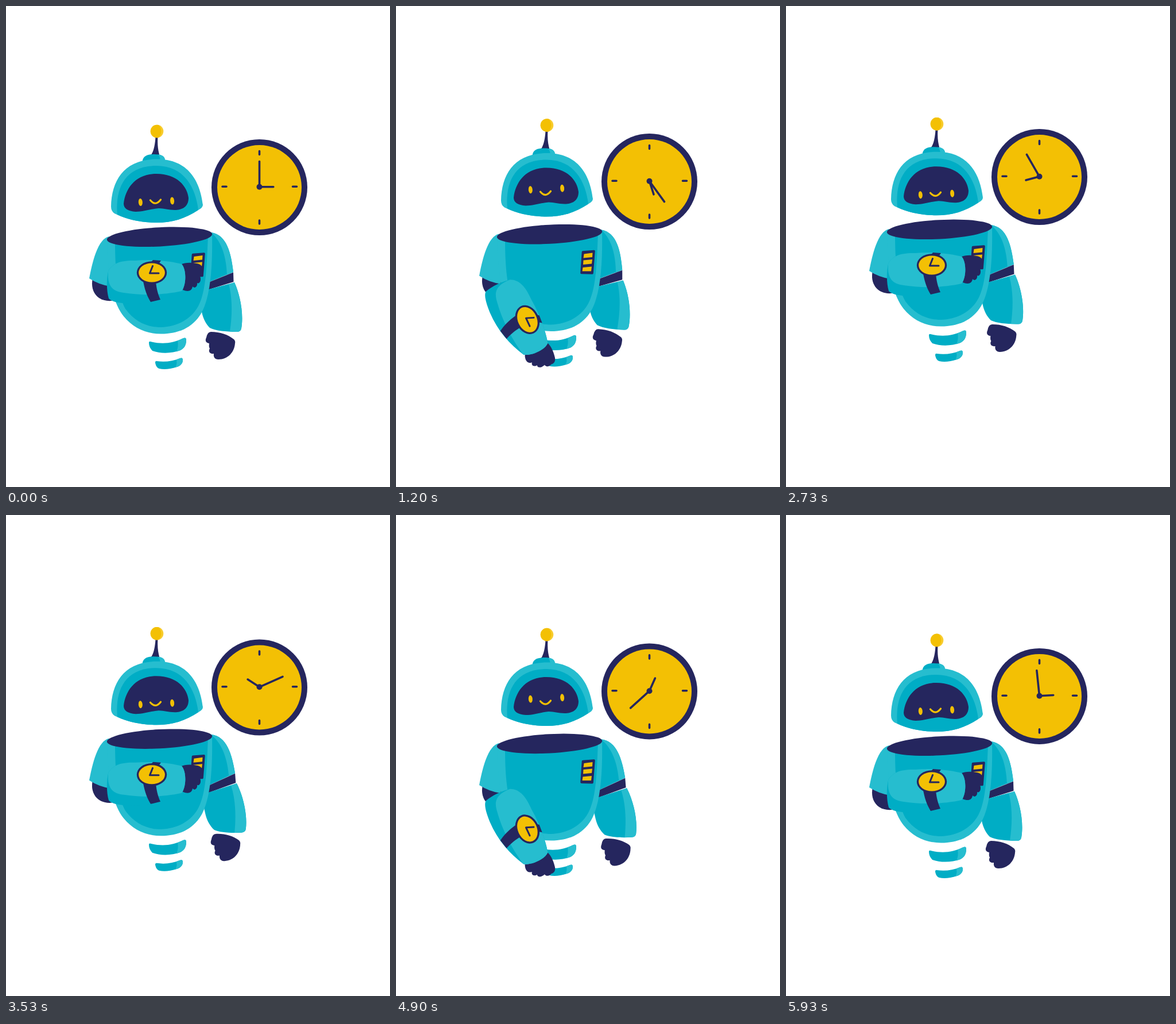
An HTML page for the animation above (6.01 s loop, 669 px wide and 837 px high).

```html
<!DOCTYPE html>
<html lang="en">
<head>
<meta charset="utf-8">
<title>Robot and clock</title>
<style>
html, body { margin: 0; width: 100%; height: 100%; overflow: hidden; background: #fff; }
svg { display: block; width: 100vw; height: 100vh; }
.navy { fill: #25265e; }
.main { fill: #00adc5; }
.light { fill: #26bdcf; }
.gold { fill: #f3c004; }
.line { fill: none; stroke: #25265e; stroke-width: 3.6; stroke-linecap: round; stroke-linejoin: round; }
</style>
</head>
<body>
<svg viewBox="0 0 669 837">
  <g id="clock">
    <circle class="navy" cx="441.5" cy="315.5" r="83.5"/>
    <circle class="gold" cx="441.5" cy="315.5" r="73.5"/>
    <path class="line" d="M441.5 252.5V258.5M441.5 373V379M377 314.3H384M499.5 314.3H506.5"/>
    <path class="line" id="minute" d="M441.5 314.8V270.5"/>
    <path class="line" id="hour" d="M441.5 314.8V290.5"/>
    <circle class="navy" cx="441.5" cy="314.8" r="5"/>
  </g>

  <g id="body">
    <g id="rightArm">
      <path class="main" d="M335 400L357 394C385 398 392 430 396 463L357 479L335 488Z"/>
      <path class="light" d="M357 394C385 398 392 430 396 463L385 468C384 442 378 411 357 394Z"/>
      <path class="navy" d="M335 488L396 463.500L396.500 480L335 499Z"/>
      <path class="main" d="M335 498L398 481C409 505 414 538 410 561Q409 567 402 567C383 567 365 565 355 560C348 553 343 543 341 532Z"/>
      <path class="light" d="M388 484L398 481C409 505 414 538 410 561Q409 567 402 567L390 566.500C394 540 395 510 388 484Z"/>
      <path class="navy" d="M357 567C373 567 387 572 397 580Q400 583 399 587C398 602 387 615 370 615C364 615 361 611 362 605C355 606 352 601 355 596C353 593 354 589 354 587C347 586 347 581 349 577Q351 567 357 567Z"/>
    </g>

    <path class="navy" d="M151 474C146 496 159 515 184 513L194 490L165 468Z"/>
    <path class="light" d="M180 401C160 404 150 447 145 474Q162 485 182 488L196 440Z"/>

    <path class="main" d="M252 584C272 589 291 587 309 578Q314 576 314 581C314 590 311 595 304 599C288 605 269 605 255 600C251 596 249 591 249 586Q249 583 252 584Z"/>
    <path class="light" d="M299 582.500L309 578Q314 576 314 581C314 590 311 595 304 599L297 601.500Q301 592 299 582.500Z"/>
    <path class="main" d="M263 618C277 620 291 618 303 613Q308 611 308 616C308 622 304 626 298 628C286 632 275 633 267 631C262 629 261 625 260 621Q260 617 263 618Z"/>
    <path class="light" d="M296.500 615.500L303 613Q308 611 308 616C308 622 304 626 298 628L295 629Q299 622 296.500 615.500Z"/>

    <path class="light" d="M176 406C177 470 185 515 205 540C222 561 245 570.500 270 570.500C300 570.500 325 560 340 535C357 505 360 450 359 397Z"/>
    <path class="main" d="M190 408C190 455 193 500 208 527C225 550 246 559 270 559C298 558 325 545 337 518C350 490 350 440 352 400Z"/>
    <ellipse class="navy" cx="267.500" cy="401.800" rx="91.800" ry="16.600" transform="rotate(-3 267.500 401.800)"/>

    <path class="line" style="fill:#25265e" d="M325.500 432.500L345 431L342 469.500L323 469Z"/>
    <path class="gold" d="M327.500 436L342.500 434L342 441.500L326.500 443ZM326.500 447L342 445.500L341 453L326 454.500ZM325.500 459.500L341 458L340 466L324.500 466Z"/>

    <g id="leftArm">
      <path class="navy" d="M304 450C312 446 322 446 332 448C340 449 343 454 342 459C345 466 341 470 338 470C341 478 337 484 333 482C334 489 328 492 325 488C324 496 317 498 308 494Z"/>
      <path class="main" d="M178 462C184 448 200 442 226 443C258 440 292 445 306 449C315 459 314 486 306 496C280 510 250 519 215 518C198 517 184 515 179 509C175 495 175 476 178 462Z"/>
      <path class="light" d="M178 462C184 448 200 442 226 443C258 440 292 445 306 449C315 459 314 486 306 496C275 503 235 504 205 499C188 497 176 490 178 462Z"/>
      <path class="navy" d="M250 449L256 442L270 443L265 450ZM239 479C242 495 246 505 252 515L269 511C264 500 262 490 261 479Z"/>
      <ellipse class="navy" cx="254" cy="464" rx="26.200" ry="19.800"/>
      <ellipse class="gold" cx="254" cy="464" rx="22.900" ry="16.500"/>
      <path class="line" style="stroke-width:3" d="M255.500 452.500L250.500 465H266"/>
    </g>
  </g>

  <g id="head">
    <path class="navy" d="M260.500 228H264.500C263.500 242 265 251 267.500 260H252C257 254 259.500 243 260.500 228Z"/>
    <circle cx="263" cy="218" r="11.300" fill="#f8cc2e"/>
    <path class="gold" d="M266 207.100A11.300 11.300 0 1 0 266 228.900Q275 218 266 207.100Z"/>
    <path class="main" d="M238 268C240 261 246 258 258 258C270 258 276 261 277 268V276H238Z"/>
    <path class="light" d="M265 258.500C273 259 277 263 277 268V276H269Q270 264 265 258.500Z"/>
    <path class="light" d="M183 349C184 303 206 266.500 263 266.500C318 266.500 338 305 343 346Q343 351 335 355C312 370 290 377 262 377C230 377 205 369 189 361Q183 357 183 349Z"/>
    <path class="main" d="M194 363C190 320 205 278 262 278C310 278 330 315 335 355C312 370 290 377 262 377C235 377 210 371 194 363Z"/>
    <path class="navy" d="M205 344C208 318 225 292 262 292C298 292 316 314 318 334C318 350 306 355 294 355C282 355 276 352 266 352C252 353 240 358 226 358C212 357 205 352 205 344Z"/>
    <path id="smile" d="M251.500 338Q260.500 349 269.500 337" fill="none" stroke="#f3c004" stroke-width="3.200" stroke-linecap="round"/>
    <ellipse class="gold eye" rx="3.500" ry="6.500"/>
    <ellipse class="gold eye" rx="3.500" ry="6.500"/>
  </g>
</svg>
<script>
const LOOP = 6010, STEPS = 120;
const el = id => document.getElementById(id);
const [clock, minute, hour, body, rightArm, leftArm, head, smile] =
  ['clock', 'minute', 'hour', 'body', 'rightArm', 'leftArm', 'head', 'smile'].map(el);
const eyes = [...document.querySelectorAll('.eye')];
const eyeSpots = [[234.3, 341.5], [289.6, 339]];

// Keys are [step, value] pairs.
const clockY = [[0, 0], [24, -10], [55, -18], [71, -15.5], [88, -10.5], [107, -6.5], [120, 0]];
const headY = [[0, 0], [12, -2.5], [24, -10.5], [40, -15], [55, -12.8], [71, -11.8], [88, -13], [107, -6], [120, 0]];
const swing = [[0, 0], [24, 1.6], [55, -0.7], [71, -2.8], [88, -4], [107, -1.6], [120, 0]];

function slope(keys, k) {
  const a = keys[k - 1], b = keys[k + 1];
  return a && b ? (b[1] - a[1]) / (b[0] - a[0]) : 0;
}

// Smooth curve through the keys
function curve(keys, x) {
  let k = 0;
  while (k < keys.length - 2 && x >= keys[k + 1][0]) k++;
  const [x0, y0] = keys[k], [x1, y1] = keys[k + 1];
  const w = x1 - x0, u = (x - x0) / w, v = 1 - u;
  return v * v * (1 + 2 * u) * y0 + u * u * (3 - 2 * u) * y1
    + w * u * v * (v * slope(keys, k) - u * slope(keys, k + 1));
}

function ease(from, to, x) {
  const u = Math.min(1, Math.max(0, (x - from) / (to - from)));
  return u * u * (3 - 2 * u);
}

const set = (node, value) => node.setAttribute('transform', value);
const shift = (node, y) => set(node, `translate(0 ${y})`);
const turn = (node, angle, x, y) => set(node, `rotate(${angle} ${x} ${y})`);

function draw(time) {
  const ms = time % LOOP;
  // Two pictures per 100 ms, held for 30 and 70 ms
  const step = Math.min(STEPS - 1, 2 * Math.floor(ms / 100) + (ms % 100 >= 30 ? 1 : 0));
  const p = step / STEPS, half = step % 60;

  shift(clock, curve(clockY, step));
  turn(minute, 720 * p, 441.5, 314.8);
  turn(hour, 90 + 360 * p, 441.5, 314.8);

  shift(body, -6.6 * (1 - Math.cos(2 * Math.PI * p)));
  turn(rightArm, curve(swing, step), 362, 400);
  const lowered = ease(11, 23, half) - ease(40, 54.5, half);
  turn(leftArm, 65 * lowered, 173.6, 487.5);

  shift(head, curve(headY, step));
  shift(smile, -4.2 * lowered);
  const open = Math.max(0.07, Math.min(1, Math.abs(half - 47) / 3));
  eyes.forEach((eye, n) => {
    const [x, y] = eyeSpots[n];
    set(eye, `translate(${x} ${y - 11.3 * lowered}) rotate(-4) scale(1 ${open})`);
  });
}

const start = performance.now();
function tick() {
  draw(performance.now() - start);
  requestAnimationFrame(tick);
}
tick();
</script>
</body>
</html>
```
